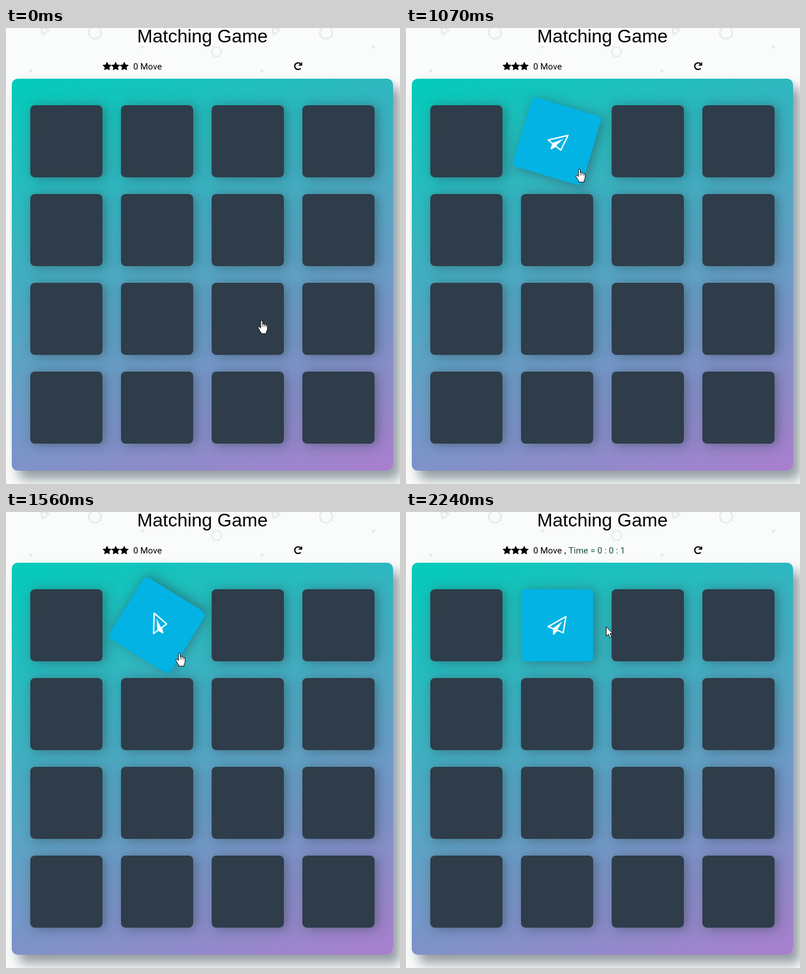
Recreate the animation shown at these times as an HTML page. Size 682x791 px, loop 2310 ms.

```html
<!DOCTYPE html>
<html lang="en">
<head>
<meta charset="utf-8">
<title>Matching Game</title>
<style>
html, body { margin: 0; width: 100%; height: 100%; overflow: hidden; background: #fafcfb; }
#stage { position: absolute; left: 0; top: 0; width: 682px; height: 791px; overflow: hidden; }
svg { position: absolute; left: 0; top: 0; }
#deck {
  position: absolute; left: 10px; top: 88px; width: 660px; height: 680px; border-radius: 10px;
  background: linear-gradient(160deg, #02ccba 0%, #aa7ecd 100%);
  box-shadow: 12px 15px 20px 0 rgba(46, 61, 73, .5);
}
.card {
  position: absolute; width: 125px; height: 125px; border-radius: 8px; background: #2e3d49;
  box-shadow: 5px 2px 20px 0 rgba(46, 61, 73, .5);
}
.card.open { background: #02b3e4; }
.card svg { left: 46px; top: 46px; visibility: hidden; }
.card.open svg { visibility: visible; }
.title { font: 32px "Liberation Sans", Arial, sans-serif; }
.info { font: 15.2px Roboto, sans-serif; }
</style>
</head>
<body>
<div id="stage">
  <svg width="682" height="791">
    <defs>
      <g id="tile" fill="none" stroke="#e6e9e9" stroke-width="2.6" stroke-linejoin="round">
        <path d="M60.5 -2L74.5 3.5L63 11.5Z"/>
        <circle cx="154" cy="8" r="10.8"/>
        <path d="M355.5 41L360 33H369L373.5 41L369 49H360Z" stroke-width="2.2"/>
        <g fill="#e6e9e9" stroke="none"><circle cx="236" cy="33" r="2.6"/><circle cx="43" cy="74.5" r="2.6"/></g>
      </g>
      <path id="star" transform="scale(.00893)" d="M1728 647q0 22-26 48l-363 354 86 500q1 7 1 20 0 50-41 50-19 0-40-12l-449-236-449 236q-22 12-40 12-42 0-42-50 0-6 2-20l86-500-364-354q-25-27-25-48 0-37 56-46l502-73 225-455q19-41 49-41t49 41l225 455 502 73q56 9 56 46z"/>
    </defs>
    <use href="#tile"/><use href="#tile" x="400"/>
    <text class="title" x="340" y="25" text-anchor="middle">Matching Game</text>
    <use href="#star" x="166.9" y="58.7"/><use href="#star" x="181.8" y="58.7"/><use href="#star" x="196.7" y="58.7"/>
    <text class="info" x="220.3" y="72">0 Move</text>
    <g id="clock" class="info"><text x="274" y="72">,</text><text x="281.3" y="72" fill="#1d4f43">Time = 0 : 0 : 1</text></g>
    <!-- reload arrow: an open ring and a corner -->
    <path d="M509.5 61.9A5.8 5.8 0 1 0 510 69.9" fill="none" stroke="#000" stroke-width="2.3"/>
    <path d="M512.4 59.6V65.1H506.4Z" stroke="#000" stroke-linejoin="round" stroke-width=".6"/>
  </svg>
  <div id="deck"></div>
  <svg width="682" height="791">
    <g fill="#fff" stroke="#000" stroke-linejoin="round">
      <path id="arrow" d="M0 0V16.5L3.8 12.9L6.5 19L9.2 17.8L6.5 11.9H11.4Z"/>
      <g id="hand">
        <path d="M-1.1 11.5V1.6Q-1.1 0 .5 0T2.1 1.6V6.2Q3.7 4.8 5.1 6.8Q6.9 5.6 8.1 7.6Q10.6 7 10.6 9.6V14.5Q10.6 17 8.8 19.2V22.6H-.6V20.6Q-2.6 18.4-3.8 15.6L-5.2 13.3Q-6 11.5-4.4 10.8Q-3 10.4-1.1 13Z"/>
        <path d="M2.1 6.2V11M5.1 6.8V11M8.1 7.6V11.4" stroke-width=".8"/>
      </g>
    </g>
  </svg>
</div>
<script>
const LOOP = 2310, SPIN_START = 1013, SPIN_TIME = 1000;
const RUNS = [[0, 140], [140, 76], [680, 160], [1070, 81.5], [1630, 78], [2240, 70]];
// pointer: start, bend, arrival, click and exit
const FROM = [442, 507.5], BEND = [235, 290], NEAR = [290.5, 262], CLICK = [299.5, 244.7], EXIT = [346.5, 199];
const ARRIVE = 520, SETTLE = 160, LEAVE = 2240;
const GAP_X = 157, GAP_Y = 154, SIZE = 125;

const $ = id => document.getElementById(id);
const clamp = x => Math.min(1, Math.max(0, x));
const mix = (p, q, u) => p.map((v, i) => v + (q[i] - v) * u);
const smooth = x => x * x * (3 - 2 * x);
const bezier = (a, b, u) => 3 * a * u * (1 - u) ** 2 + 3 * b * u * u * (1 - u) + u ** 3;

const cards = Array.from({ length: 16 }, (_, i) => {
  const card = document.createElement('div');
  card.className = 'card';
  card.style.left = 32 + GAP_X * (i % 4) + 'px';
  card.style.top = 46 + GAP_Y * Math.floor(i / 4) + 'px';
  $('deck').append(card);
  return card;
});
const picked = cards[1];
picked.innerHTML = `<svg width="33" height="33" viewBox="0 0 1792 1792"><path fill="#fff" d="M1764 11
  q33 24 27 64l-256 1536q-5 29-32 45-14 8-31 8-11 0-24-5l-527-215-298 327q-18 21-47 21-64 0-64-64v-452
  l-472-193q-37-14-40-55-3-39 32-59l1664-960q35-21 68 2z
  m-342 1499l221-1323-1434 827 336 137 863-639-478 797z"/></svg>`;

// steep start, long slow end
function ease(x) {
  let lo = 0, hi = 1;
  for (let i = 0; i < 24; i++) {
    const mid = (lo + hi) / 2;
    if (bezier(.22, .28, mid) < clamp(x)) lo = mid; else hi = mid;
  }
  return bezier(.1, 1, hi);
}

// time of the picture on show, on a 10 ms clock
function snap(time) {
  const [start, step] = RUNS.findLast(run => run[0] <= time);
  const tick = start + step * Math.floor((time - start) / step);
  return Math.ceil(tick / 10) * 10;
}

function pointer(t) {
  if (t >= LEAVE) return EXIT;
  if (t >= ARRIVE) return mix(NEAR, CLICK, ease((t - ARRIVE) / SETTLE));
  const u = smooth(t / ARRIVE);
  return mix(mix(FROM, BEND, u), mix(BEND, NEAR, u), u);
}

function place(id, [x, y], shown) {
  $(id).setAttribute('transform', `translate(${x} ${y})`);
  $(id).setAttribute('visibility', shown ? 'visible' : 'hidden');
}

function draw(time) {
  const t = snap(time), tip = pointer(t);
  const onCard = (tip[0] - 42) % GAP_X < SIZE && (tip[1] - 134) % GAP_Y < SIZE;
  place('arrow', tip, !onCard);
  place('hand', tip, onCard);

  const spin = (t - SPIN_START) / SPIN_TIME;
  picked.classList.toggle('open', spin > 0);
  picked.style.transform = spin > 0 && spin < 1 ? `rotate(${360 * ease(spin)}deg)` : 'none';
  $('clock').setAttribute('visibility', spin >= 1 ? 'visible' : 'hidden');
}

const start = performance.now();
function frame() {
  draw((performance.now() - start) % LOOP);
  requestAnimationFrame(frame);
}
draw(0);
requestAnimationFrame(frame);
</script>
</body>
</html>
```
